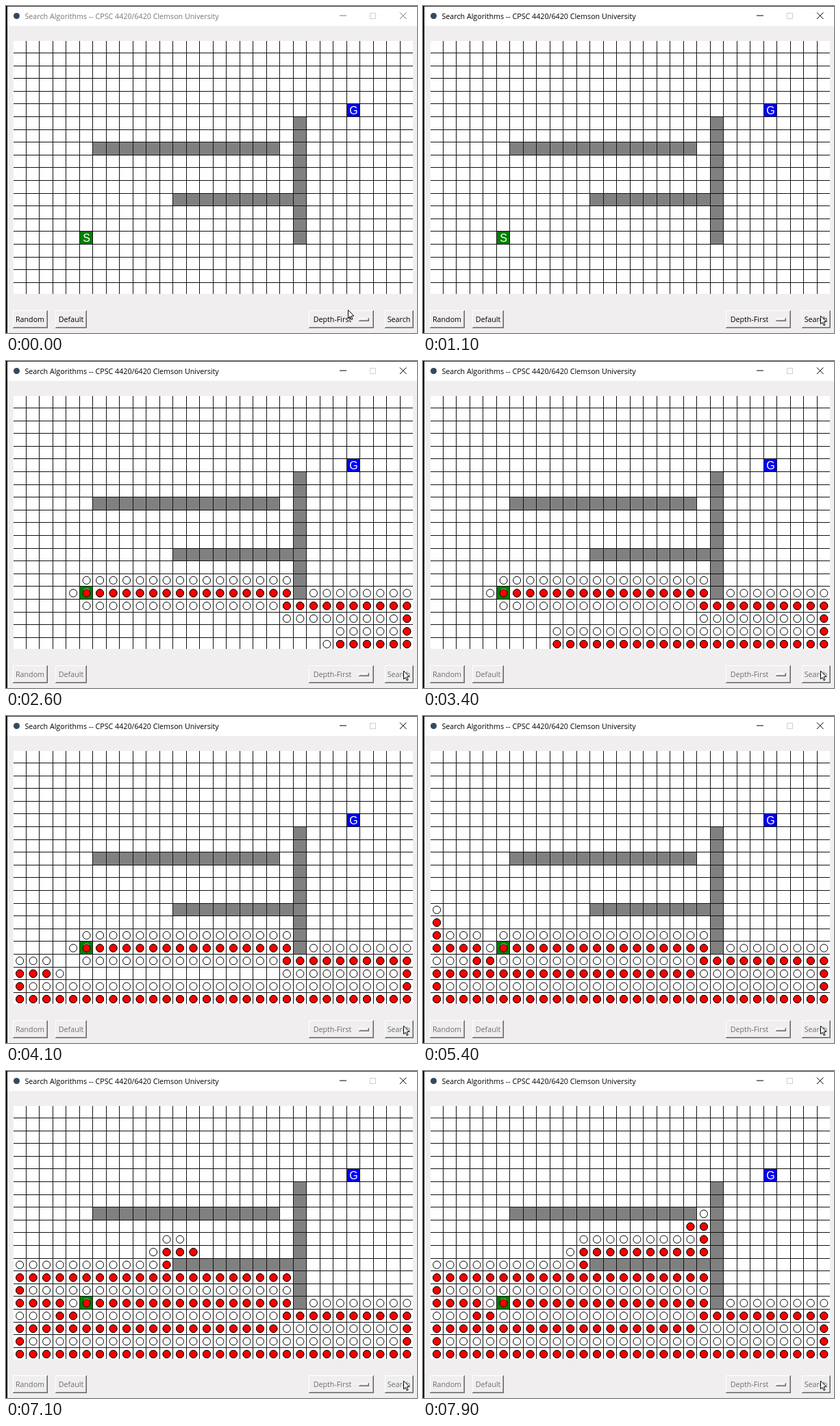
Animation of 600 by 477 pixels, one loop 8 s. Source, as an HTML page with a canvas:

```html
<!DOCTYPE html>
<html lang="en">
<head>
<meta charset="utf-8">
<title>Search Algorithms</title>
<style>
  html, body { margin: 0; width: 600px; height: 477px; overflow: hidden; background: #f0eeef; }
  canvas { display: block; }
</style>
</head>
<body>
<canvas id="stage" width="600" height="477"></canvas>
<script>
const ctx = document.getElementById('stage').getContext('2d');
const COLS = 30, ROWS = 20, LOOP = 8000;
const START = [5, 15], GOAL = [25, 5];
const UI_FONT = '10.7px "Open Sans", "Noto Sans", sans-serif';
const CELL_FONT = '16px "Liberation Sans", Arial, sans-serif';
const FACE = '#f0eeef', LINE = '#111111';
const ACTIVATE = 1000, CLICK = 1200;

// Search progress: [time, circles drawn]; it slows as the canvas fills up
const PACE = [[CLICK, 0], [1800, 62], [2600, 122], [4100, 204], [5400, 257], [6600, 301], [7900, 347]];

const gridX = c => 10 + 19.49 * c;
const gridY = r => 49.9 + 18.6 * r;
const center = (c, r) => [gridX(c + 0.5) + 0.4, gridY(r + 0.5) + 0.4];
const isWall = (c, r) =>
  (c === 21 && r >= 6 && r <= 15) ||
  (r === 8 && c >= 6 && c <= 19) ||
  (r === 12 && c >= 12 && c <= 20);

// Depth-first search, recorded as a list of circles to draw
function search() {
  const steps = [], stack = [START], seen = new Set([String(START)]);
  while (stack.length) {
    const [c, r] = stack.pop();
    steps.push([c, r, '#ff0000']);
    if (c === GOAL[0] && r === GOAL[1]) break;
    for (const [dc, dr] of [[0, -1], [-1, 0], [0, 1], [1, 0]]) {
      const x = c + dc, y = r + dr, key = String([x, y]);
      if (x < 0 || y < 0 || x >= COLS || y >= ROWS || isWall(x, y) || seen.has(key)) continue;
      seen.add(key);
      stack.push([x, y]);
      steps.push([x, y, '#ffffff']);
    }
  }
  return steps;
}
const steps = search();

function stepsAt(t) {
  if (t <= CLICK) return 0;
  for (let i = 1; i < PACE.length; i++) {
    const [t0, n0] = PACE[i - 1], [t1, n1] = PACE[i];
    if (t <= t1) return Math.round(n0 + (n1 - n0) * (t - t0) / (t1 - t0));
  }
  return PACE[PACE.length - 1][1];
}

function rect(x, y, w, h, color) {
  ctx.fillStyle = color;
  ctx.fillRect(x, y, w, h);
}

function text(str, x, y, color, font = UI_FONT, align = 'left') {
  ctx.font = font;
  ctx.textAlign = align;
  ctx.fillStyle = color;
  ctx.fillText(str, x, y);
}

function path(points, color) {
  ctx.beginPath();
  points.forEach(([x, y]) => ctx.lineTo(x, y));
  ctx.strokeStyle = color;
  ctx.lineWidth = 1;
  ctx.stroke();
}

function raised(x, y, w, h) {
  rect(x, y, w, h, '#696969');
  rect(x, y, w - 1, h - 1, '#ffffff');
  rect(x + 1, y + 1, w - 2, h - 2, '#a0a0a0');
  rect(x + 1, y + 1, w - 3, h - 3, FACE);
}

function fillCell(c, r, color) {
  const x = Math.floor(gridX(c)), y = Math.floor(gridY(r));
  rect(x, y, Math.floor(gridX(c + 1)) - x + 1, Math.floor(gridY(r + 1)) - y + 1, color);
}

function label(str, cell) {
  const [x, y] = center(...cell);
  text(str, x, y + 5.5, '#ffffff', CELL_FONT, 'center');
}

function titleBar(active) {
  const ink = active ? '#000000' : '#777777';
  rect(2, 0, 598, 29, '#ffffff');
  rect(0, 0, 600, 1, '#404040');
  ctx.beginPath();
  ctx.arc(15.5, 14.5, 4.5, 0, 7);
  ctx.fillStyle = '#34495f';
  ctx.fill();
  text('Search Algorithms -- CPSC 4420/6420 Clemson University', 27.5, 19, ink);
  path([[487, 14], [497, 14]], ink);
  ctx.strokeStyle = '#d0d0d0';
  ctx.strokeRect(531.5, 10.5, 8, 8);
  path([[575, 9.5], [584.5, 19]], ink);
  path([[584.5, 9.5], [575, 19]], ink);
}

function board(count) {
  rect(11, 51, 583, 369, '#ffffff');
  for (let c = 0; c < COLS; c++)
    for (let r = 0; r < ROWS; r++)
      if (isWall(c, r)) fillCell(c, r, '#808080');
  fillCell(...START, '#008000');
  fillCell(...GOAL, '#0000f5');
  for (let c = 1; c < COLS; c++) rect(Math.floor(gridX(c)), 51, 1, 369, LINE);
  for (let r = 1; r < ROWS; r++) rect(11, Math.floor(gridY(r)), 583, 1, LINE);
  label('S', START);
  label('G', GOAL);

  ctx.strokeStyle = '#000000';
  ctx.lineWidth = 1;
  for (const [c, r, color] of steps.slice(0, count)) {
    ctx.beginPath();
    ctx.ellipse(...center(c, r), 5.5, 5.6, 0, 0, 7);
    ctx.fillStyle = color;
    ctx.fill();
    ctx.stroke();
  }
}

function controls(enabled) {
  const ink = enabled ? '#000000' : '#6d6d6d';
  for (const [str, x, w, tx] of [
    ['Random', 10, 51, 35], ['Default', 72, 46, 95],
    ['Depth-First', 442, 95, 476.5], ['Search', 553, 42, 573.5]
  ]) {
    raised(x, 444, w, 26);
    text(str, tx, 461, ink, UI_FONT, 'center');
  }
  raised(515, 455, 15, 5);
}

function cursor(t) {
  const p = Math.min(1, Math.max(0, (t - 100) / 800)), k = p * p * (3 - 2 * p);
  ctx.save();
  ctx.translate(499.5 + 81 * k, 443.5 + 8.5 * k);
  ctx.beginPath();
  for (const [x, y] of [[0, 0], [0, 12], [2.7, 9.5], [4.7, 14], [6.5, 13.2], [4.6, 8.8], [8.3, 8.5]])
    ctx.lineTo(x, y);
  ctx.closePath();
  ctx.fillStyle = '#ffffff';
  ctx.fill();
  ctx.strokeStyle = '#000000';
  ctx.lineWidth = 1;
  ctx.stroke();
  ctx.restore();
}

function frame() {
  const t = Math.floor((performance.now() % LOOP) / 100) * 100;
  rect(0, 0, 600, 477, FACE);
  titleBar(t >= ACTIVATE);
  rect(0, 0, 2, 477, '#000000');
  board(stepsAt(t));
  controls(t < CLICK);
  cursor(t);
  requestAnimationFrame(frame);
}
frame();
</script>
</body>
</html>
```
